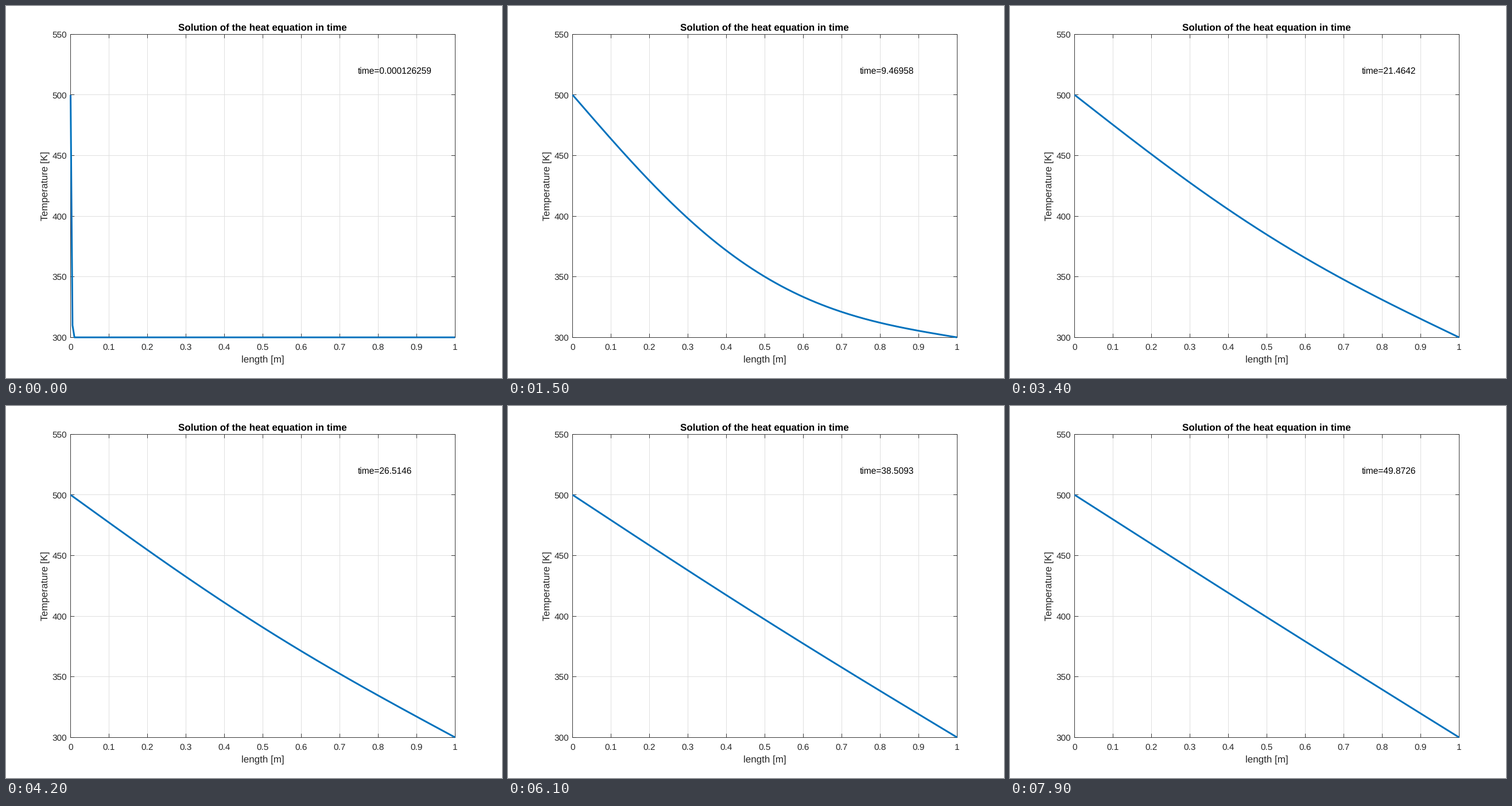
A matplotlib script for the animation above (8 s loop, 864 by 648 pixels).

```python
import numpy as np
import matplotlib.pyplot as plt
from matplotlib.animation import FuncAnimation

plt.rcParams["font.family"] = "Liberation Sans"
plt.rcParams["text.hinting"] = "none"

W, H = 864, 648
LEFT, RIGHT, TOP, BOTTOM = 112.5, 782.2, 49.2, 577.2
T_MIN, T_MAX = 300, 550
INK = "#262626"
TICK_SIZE, LABEL_SIZE = 15.43, 16.97
FRAMES, INTERVAL = 80, 100

# Explicit heat-equation scheme on a rod with fixed end temperatures
NODES, ALPHA, RATIO = 200, 0.01, 0.05
STEPS_PER_FRAME = 5000
CELLS = NODES - 1
DT = RATIO / CELLS**2 / ALPHA

x = np.linspace(0, 1, NODES)
steady = 500 - 200 * x
start = np.full(NODES, 300.0)
start[0] = 500

# Eigenmodes of the scheme give the state after any number of steps
n = np.arange(1, CELLS)
modes = np.sin(np.pi * np.outer(x, n))
weights = 2 / CELLS * modes.T @ (start - steady)
decay = 1 - 4 * RATIO * np.sin(np.pi * n / (2 * CELLS)) ** 2


def temperature(steps):
    return steady + modes @ (weights * decay**steps)


def px(value):
    return LEFT + (RIGHT - LEFT) * value


def py(temp):
    return BOTTOM - (BOTTOM - TOP) * (temp - T_MIN) / (T_MAX - T_MIN)


def crisp(value):
    return np.floor(value) + 0.5


fig = plt.figure(figsize=(W / 72, H / 72), dpi=72, facecolor="white")
ax = fig.add_axes([0, 0, 1, 1])
ax.set(xlim=(0, W), ylim=(H, 0))
ax.axis("off")


def rule(x0, y0, x1, y1, color=INK, width=0.9, z=2):
    ax.plot([x0, x1], [y0, y1], color=color, lw=width, zorder=z,
            snap=False, solid_capstyle="butt")


def label(x0, y0, text, size=TICK_SIZE, color=INK, ha="center", **kw):
    return ax.text(x0, y0, text, fontsize=size, color=color, ha=ha,
                   va="baseline", **kw)


left, right, top, bottom = (crisp(v) for v in (LEFT, RIGHT, TOP, BOTTOM))
TICK = 6.7

for k in range(11):
    gx = crisp(px(k / 10))
    rule(gx, top, gx, bottom, "#dfdfdf", 1, 1)
    rule(gx, bottom, gx, bottom - TICK)
    rule(gx, top, gx, top + TICK)
    label(px(k / 10), 599, f"{k / 10:g}")

for temp in range(T_MIN, T_MAX + 1, 50):
    gy = crisp(py(temp))
    rule(left, gy, right, gy, "#dfdfdf", 1, 1)
    rule(left, gy, left + TICK, gy)
    rule(right, gy, right - TICK, gy)
    label(105.8, py(temp) + 5.7, str(temp), ha="right")

for edge in (left, right):
    rule(edge, top - 0.5, edge, bottom + 0.5)
for edge in (top, bottom):
    rule(left - 0.5, edge, right + 0.5, edge)

label(px(0.5), 42.5, "Solution of the heat equation in time", LABEL_SIZE,
      "black", weight="bold")
label(px(0.5), 620.3, "length [m]", LABEL_SIZE)
label(72, (TOP + BOTTOM) / 2, "Temperature [K]", LABEL_SIZE, rotation=90,
      rotation_mode="anchor")
clock = label(612.3, 117.4, "", 15.5, "black", ha="left")

curve, = ax.plot([], [], color="#0072BD", lw=3, zorder=3, snap=False,
                 solid_capstyle="butt", solid_joinstyle="round")


def update(frame):
    steps = 1 + STEPS_PER_FRAME * frame
    curve.set_data(px(x), py(temperature(steps)))
    clock.set_text(f"time={steps * DT:g}")
    return curve, clock


anim = FuncAnimation(fig, update, frames=FRAMES, interval=INTERVAL,
                     init_func=lambda: update(0), repeat=True, repeat_delay=0)
plt.show()
```
